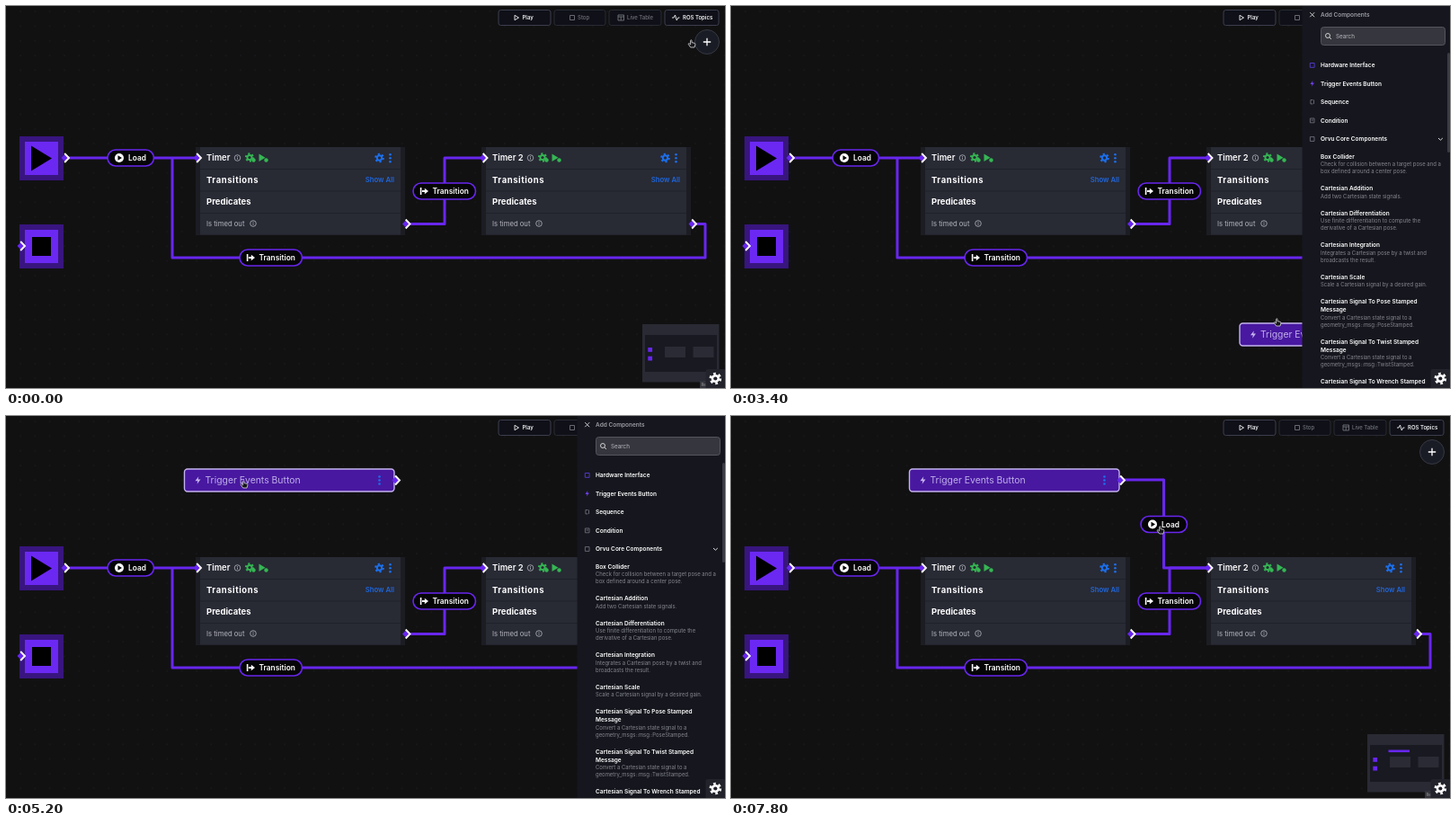
These frames come from a looping animation (800 px wide and 425 px high, 8 s). An HTML page:

```html
<!DOCTYPE html>
<html lang="en">
<head>
<meta charset="utf-8">
<title>Node editor</title>
<style>
html, body { margin: 0; width: 100%; height: 100%; overflow: hidden; background: #111112; }
svg { display: block; width: 100vw; height: 100vh; }
text { font-family: Inter, "Open Sans", sans-serif; white-space: pre; }
</style>
</head>
<body>
<svg id="stage" viewBox="0 0 800 425"></svg>
<script>
const PURPLE = '#6826ee', BLUE = '#1c6fec', GREEN = '#35b653';

const rect = (x, y, w, h, fill, more = '') =>
  `<rect x="${x}" y="${y}" width="${w}" height="${h}" fill="${fill}" ${more}/>`;
const text = (x, y, size, label, fill = '#fff', weight = 600, more = '') =>
  `<text x="${x}" y="${y}" font-size="${size}" fill="${fill}" font-weight="${weight}" ${more}>${label}</text>`;
const line = (d, color, width = 1, more = '') =>
  `<path d="${d}" fill="none" stroke="${color}" stroke-width="${width}" ${more}/>`;
const shape = (d, fill) => `<path d="${d}" fill="${fill}"/>`;
const circle = (x, y, r, fill, more = '') => `<circle cx="${x}" cy="${y}" r="${r}" fill="${fill}" ${more}/>`;
const group = (x, y, content, more = '') => `<g transform="translate(${x} ${y})" ${more}>${content}</g>`;

const gear = (x, y, r, color, hole) =>
  circle(x, y, r * .82, 'none', `stroke="${color}" stroke-width="${r * .42}" stroke-dasharray="${r * .4} ${r * .459}"`) +
  circle(x, y, r * .7, color) + circle(x, y, r * .32, hole);
const port = (x, y) => group(x, y,
  shape('M-4.5 0L0-4.8 4.5 0 0 4.8Z', PURPLE) + line('M-.8-5L4 0-.8 5', '#fff', 1.9));
const edge = d => line(d, PURPLE, 3, 'stroke-linejoin="round"');
const info = (x, y) => circle(x, y, 3.3, 'none', 'stroke="#b4b5bf" stroke-width=".8"') +
  line(`M${x} ${y - .5}v2.2M${x} ${y - 2}v.9`, '#b4b5bf', .8);
const menuDots = (x, y) => [-4, 0, 4].map(d => circle(x, y + d, 1.3, BLUE)).join('');
const bolt = (x, y, s, fill) =>
  shape(`M${x + s * .2} ${y - s}L${x - s * .7} ${y + s * .2}H${x - s * .05}L${x - s * .2} ${y + s}L${x + s * .7} ${y - s * .25}H${x + s * .05}Z`, fill);

function pill(x, y, label) {
  const load = label === 'Load';
  const icon = load
    ? circle(13, 9, 5, '#fff') + shape('M11.5 6.3L16 9l-4.5 2.7Z', '#000')
    : line('M8.6 5v8', '#fff', 1.6) + line('M10 9h4', '#fff', 2) + shape('M12.8 5.7L17 9l-4.2 3.3Z', '#fff');
  return group(x, y, rect(0, 0, load ? 51.5 : 69.5, 18, '#050507', `rx="9" stroke="${PURPLE}" stroke-width="1.6"`) +
    icon + text(load ? 23 : 21.5, 12, 8.4, label));
}

function endpoint(y, symbol) {
  return group(15, y, rect(0, 0, 49, 49, '#38157f') + rect(6, 6, 37, 37, '#6b28f2') + symbol);
}

function timerCard(x, name, iconX) {
  return group(x, 157,
    rect(0, 0, 233, 98, '#1c1d23') + rect(5, 0, 223, 97.5, '#282a34') +
    line('M5 24.5h223M5 49h223M5 73.5h223', '#20222a') +
    text(12, 15, 9.4, name) + info(iconX, 12) +
    gear(iconX + 13.5, 11.5, 5, GREEN, '#282a34') + circle(iconX + 18, 14.5, 2.2, GREEN) +
    shape(`M${iconX + 24} 7.5l7 4.2-7 4.3Z`, GREEN) + circle(iconX + 32, 14.5, 2.2, GREEN) +
    gear(204.5, 12, 5.2, BLUE, '#282a34') + menuDots(216.5, 12.3) +
    text(12, 39.5, 9.5, 'Transitions', '#fff', 700, 'letter-spacing=".55"') +
    text(221, 38.5, 7.7, 'Show All', '#1f67dc', 600, 'text-anchor="end" class="show"') +
    text(12, 63.5, 9.5, 'Predicates', '#fff', 700) +
    text(12, 87.5, 7.7, 'Is timed out', '#b4b5bf', 400) + info(64, 85));
}

function toolButton(x, w, label, labelX, icon, active) {
  const color = active ? '#f2f2f4' : '#73747b';
  return rect(x, 4.5, w, 17, '#0f1018', `rx="2.5" stroke="${active ? '#3c3e4d' : '#292b33'}"`) +
    line(icon, color, .9) + text(labelX, 15, 6, label, color, active ? 600 : 500);
}

const toolbar =
  toolButton(548, 58, 'Play', 574.5, 'M566 10.3l4.5 2.7-4.5 2.7Z', true) +
  toolButton(610, 57, 'Stop', 636, 'M627.5 10.5h5v5h-5Z', false) +
  toolButton(671, 58, 'Live Table', 691, 'M681 10h6.5v6h-6.5ZM681 12h6.5M684.2 12v4', false) +
  toolButton(733, 60, 'ROS Topics', 753, 'M741 13h2l1.5-3 1.8 6 1.5-3h1.7', true) +
  circle(780, 40, 13.5, '#1a1c25', 'stroke="#363843"') + line('M775.8 40h8.4M780 35.8v8.4', '#fff', 1.3);

const minimap = rect(708, 354, 85.5, 64.5, '#292a33') + rect(711, 366, 80, 41, '#181921') +
  rect(733, 379, 23, 12, '#2a2b34') + rect(764.5, 379, 23, 12, '#2a2b34') +
  rect(714.3, 380, 4.8, 4.8, PURPLE) + rect(714.3, 389.7, 4.8, 4.8, PURPLE) +
  rect(731.5, 371.5, 23.5, 2.6, PURPLE, 'id="miniTrigger"') +
  rect(772, 417, 8, 8, '#34353c') + text(773.5, 422.5, 4.5, 'Re', '#999', 400);

const components = [
  [169.5, ['Box Collider'], ['Check for collision between a target pose and a', 'box defined around a center pose.']],
  [205, ['Cartesian Addition'], ['Add two Cartesian state signals.']],
  [232.5, ['Cartesian Differentiation'], ['Use finite differentiation to compute the', 'derivative of a Cartesian pose.']],
  [268, ['Cartesian Integration'], ['Integrates a Cartesian pose by a twist and', 'broadcasts the result.']],
  [303.5, ['Cartesian Scale'], ['Scale a Cartesian signal by a desired gain.']],
  [331, ['Cartesian Signal To Pose Stamped', 'Message'], ['Convert a Cartesian state signal to a', 'geometry_msgs::msg::PoseStamped.']],
  [375.5, ['Cartesian Signal To Twist Stamped', 'Message'], ['Convert a Cartesian state signal to a', 'geometry_msgs::msg::TwistStamped.']],
  [420, ['Cartesian Signal To Wrench Stamped'], []]
];
const componentList = components.map(([y, title, about]) =>
  title.map((s, i) => text(656, y + i * 9, 6.5, s)).join('') +
  about.map((s, i) => text(656, y + title.length * 9 - .3 + i * 8.1, 5.95, s, '#85868e', 400)).join('')).join('');

const categories = ['Hardware Interface', 'Trigger Events Button', 'Sequence', 'Condition', 'Orvu Core Components']
  .map((s, i) => text(656, 68 + i * 20.5, 6.5, s)).join('');

const panel = rect(635.5, 0, 165, 425, '#16171e') +
  line('M644.2 7.2l5 5M649.2 7.2l-5 5', '#c9c9ce') + text(656, 11.5, 6.5, 'Add Components', '#9c9da4') +
  rect(656.5, 23.5, 138, 20, '#36373e', 'rx="3" stroke="#55565d"') +
  circle(664, 33, 2.5, 'none', 'stroke="#ddd" stroke-width=".9"') + line('M665.8 34.8l2.2 2.2', '#ddd', .9) +
  text(673, 35.8, 6.3, 'Search', '#b9bac0', 400) +
  rect(641, 78, 154, 17, '#272831', 'rx="3" id="rowHover"') + categories +
  line('M644.3 63.5h4.8v4.8h-4.8Z', '#5038c4') + bolt(646.7, 86.3, 3.2, '#7040ee') +
  line('M647.5 104.5h-2.6v4.4h2.6M648.5 104.5v4.4', '#777883', .8) +
  line('M644.4 125h4.6v4.8h-4.6ZM645.5 127h2.5', '#777883', .8) +
  line('M644.4 145.6h4.6v4.8h-4.6Z', '#777883', .8) +
  line('M787 147l2.4 2.2 2.4-2.2', '#ddd') + componentList + rect(797, 52, 3, 111, '#3a3b43', 'rx="1.5"');

const trigger = rect(0, 0, 233.5, 25, '#4818a0', 'rx="3.5" id="triggerBox"') +
  bolt(15, 12.5, 4.3, '#c5b4ef') + text(23, 16, 10.4, 'Trigger Events Button', '#bfaeea', 400) +
  menuDots(217, 12.5) + port(235.5, 12.5);

const hand = shape('M-1.4-3.5c0-1 1.4-1 1.4 0v2.1l3 .7c.9.3 1 1 .8 1.8L3 4H-1.3L-3.6.8c-.6-1 .4-1.5 1-.9l1.2 1Z', '#16161a');

stage.innerHTML = `<defs><pattern id="dots" x="15" y="5" width="16.33" height="16.33" patternUnits="userSpaceOnUse">
  ${circle(1, 1, .55, '#2a2a2d')}</pattern></defs>` +
  rect(0, 0, 800, 425, '#111112') + rect(0, 0, 800, 425, 'url(#dots)') +
  edge('M69 169H211') + edge('M447 242.5H488V169H531') + edge('M767 242.5H778V280H185V169') +
  `<g id="newEdge">${edge('M437 71H481.5V169H531')}</g>` +
  endpoint(145, shape('M13 10.5L36 24.5 13 38.5Z', '#000')) + endpoint(243, rect(14, 14, 21, 21, '#000')) +
  timerCard(211, 'Timer', 46.5) + timerCard(529, 'Timer 2', 54.5) +
  [[66, 169], [17, 267], [213, 169], [445.5, 242.5], [531.5, 169], [764, 242.5]].map(p => port(...p)).join('') +
  pill(113, 160, 'Load') + pill(453, 197, 'Transition') + pill(260, 271, 'Transition') +
  `<g id="newPill">${pill(456, 111.5, 'Load')}</g>` +
  `<g id="trigger">${trigger}</g>` + line('', '#b5b5ba', .9, 'id="wire"') +
  toolbar + minimap + `<g id="panel">${panel}</g>` +
  rect(778.5, 404, 22, 22, '#22232b', 'rx="2"') + gear(789.3, 414.5, 6.6, '#fff', '#22232b') +
  `<g id="cursor"><g id="hand" stroke="#c9c9cc" stroke-width=".9">${hand}</g>
   <g id="cross">${line('M-4 0h8M0-4v8', '#ddd', 2.4) + line('M-3.4 0h6.8M0-3.4v6.8', '#111', 1)}</g></g>`;

const $ = id => document.getElementById(id);
const show = (id, on) => $(id).setAttribute('visibility', on ? 'visible' : 'hidden');
const move = (id, x, y) => $(id).setAttribute('transform', `translate(${x} ${y})`);

// Linear interpolation through [time, ...values] keys.
function track(keys, t) {
  const next = keys.findIndex(k => k[0] > t);
  if (next < 0) return keys.at(-1).slice(1);
  const a = keys[Math.max(0, next - 1)], b = keys[next];
  const p = b === a ? 0 : (t - a[0]) / (b[0] - a[0]);
  return a.slice(1).map((v, i) => v + (b[i + 1] - v) * p);
}

const cursorKeys = [[0, 763, 42], [400, 779, 41], [800, 779, 41], [1200, 740, 76], [1400, 725, 86], [2000, 725, 86],
  [2200, 719, 98], [2600, 660, 235], [3000, 608, 352], [3400, 608, 352], [3600, 565, 305], [3800, 468, 200],
  [4000, 350, 112], [4200, 285, 85], [4400, 266, 82], [4600, 264, 76], [5200, 265, 76], [5600, 432, 72],
  [5800, 436, 73], [6200, 472, 115], [6600, 524, 168], [6800, 535, 175], [7000, 535, 175], [7200, 528, 168], [7800, 478, 127]];
const panelKeys = [[400, 165], [600, 120], [800, 20], [1000, 0], [7000, 0], [7200, 30], [7400, 130], [7600, 165]];
// Trigger position in snap-grid cells away from its final place.
const dragKeys = [[3400, 30, 24], [3600, 26, 20], [3800, 18, 11], [4000, 9, 3], [4200, 4, 1], [4400, 2, 1], [4600, 0, 0]];
const SNAP = 12.25;

function draw(t) {
  const [cx, cy] = track(cursorKeys, t), [slide] = track(panelKeys, t);
  const [col, row] = track(dragKeys, t).map(Math.round);
  const wiring = t >= 5800 && t < 7200, connected = t >= 7200, selected = t >= 3400;

  move('panel', slide, 0);
  show('panel', slide < 165);
  show('rowHover', t >= 1400 && t < 2200);
  move('trigger', 198.5 + col * SNAP, 59 + row * SNAP);
  show('trigger', t >= 1800);
  show('miniTrigger', t >= 1800);
  $('triggerBox').setAttribute('stroke', selected ? '#c4b2ee' : '#7437ec');
  $('triggerBox').setAttribute('stroke-width', selected ? 1.4 : 1);

  show('wire', wiring);
  const [ex, ey] = t >= 6800 ? [531, 169] : [cx, cy], mid = (436 + ex) / 2;
  $('wire').setAttribute('d', `M436 71.5C${mid} 71.5 ${mid} ${ey} ${ex} ${ey}`);
  show('newEdge', connected);
  show('newPill', connected);
  document.querySelectorAll('.show').forEach(el => el.textContent = wiring ? 'Drag to Open' : 'Show All');

  move('cursor', cx, cy);
  show('hand', !wiring);
  show('cross', wiring);
}

function tick() {
  draw(Math.floor(performance.now() % 8000 / 200) * 200);
  requestAnimationFrame(tick);
}
tick();
</script>
</body>
</html>
```
